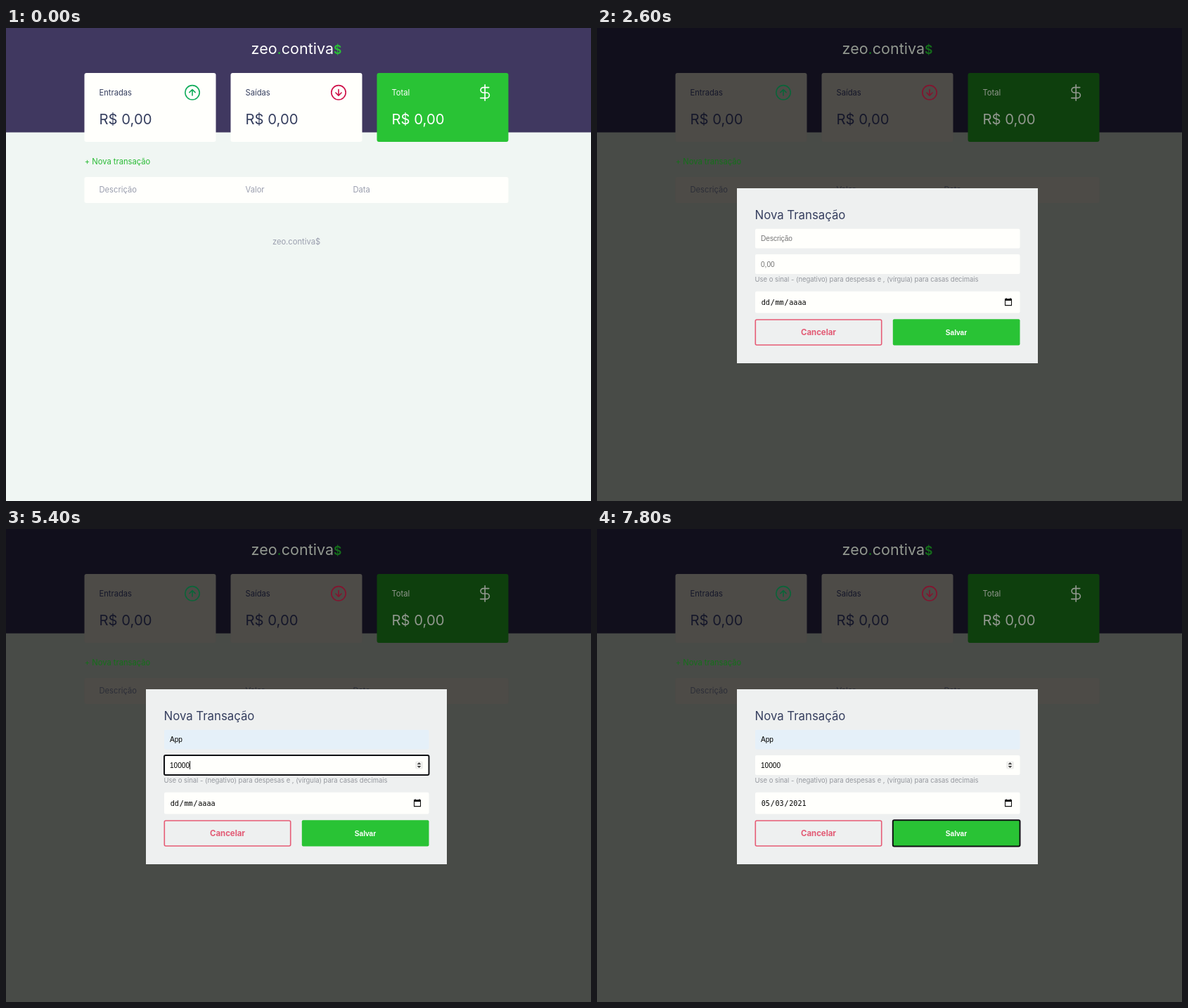
Animation, 832 px wide and 673 px high, one loop 8000 ms. Source, as an HTML page:

```html
<!DOCTYPE html>
<html lang="pt-BR">
<head>
<meta charset="utf-8">
<title>Controle financeiro</title>
<style>
  html, body { margin: 0; width: 100%; height: 100%; overflow: hidden; }
  svg {
    display: block; width: 832px; height: 673px;
    font: 11.2px Inter, sans-serif; font-optical-sizing: none;
    --page: #f0f6f3; --head: #403860; --card: #fffffc; --total: #29c335;
    --ink: #363f5f; --mute: #9a9eae; --light: #fff; --link: #29bb35;
    --up: #12ad5b; --down: #cf1149; --dot: #29c335;
  }
  svg.hover { --link: #31d93e; }
  svg.dim {
    --page: #484b47; --head: #110f1c; --card: #4d4b47; --total: #0e3f0d;
    --ink: #15172a; --mute: #2c2e38; --light: #92988f; --link: #14701a;
    --up: #0c6439; --down: #83142f; --dot: #146e1a;
  }
  .logo { font-size: 21.5px; }
  .money { font-size: 20.3px; }
  .head { font-size: 16.8px; }
  .help { font-size: 9.44px; }
  .strong { font-size: 11.4px; font-weight: 700; }
  .field { font: 10.1px "Liberation Sans", Arial, sans-serif; }
  .bold { font-weight: 700; }
  .mono { font: 10.1px "DejaVu Sans Mono", monospace; }
  .list { font: 500 11.9px "Noto Sans", sans-serif; }
  .shade { filter: drop-shadow(0 1px 2px rgba(0, 0, 0, .45)); }
  .line { fill: none; stroke-width: 1.6; stroke-linecap: round; stroke-linejoin: round; }
</style>
</head>
<body>
<svg id="stage" viewBox="0 0 832 673"></svg>
<script>
const LOOP = 8000;
const stage = document.getElementById('stage');
const brand = ['zeo', 'contiva'];

// Each step changes part of the state from its time (ms) onwards.
const steps = [
  [0, { hover: false, open: false, focus: '', desc: '', amount: '', caret: 0,
        spin: false, list: false, pick: false, filled: false,
        date: ['dd', 'mm', 'aaaa'], part: -1 }],
  [1200, { hover: true }],
  [1800, { open: true }],
  [2400, { spin: true }],
  [2600, { spin: false }],
  [3000, { focus: 'desc', list: true, caret: 233.5 }],
  [3100, { pick: true, desc: 'App', filled: true }],
  [3600, { list: false, caret: 251.5, spin: true }],
  [3900, { focus: 'amount', caret: 233.5 }],
  [4500, { amount: '1', caret: 239.2 }],
  [4800, { amount: '10', caret: 244.8 }],
  [5200, { amount: '1000', caret: 256 }],
  [5400, { amount: '10000', caret: 261.6 }],
  [5700, { focus: 'date', part: 0 }],
  [6200, { date: ['00', 'mm', 'aaaa'] }],
  [6300, { date: ['05', 'mm', 'aaaa'], part: 1 }],
  [6700, { date: ['05', '03', 'aaaa'], part: 2 }],
  [6900, { date: ['05', '03', '0002'] }],
  [7200, { date: ['05', '03', '0202'] }],
  [7400, { date: ['05', '03', '2021'] }],
  [7800, { focus: 'save', part: -1 }]
];

const rect = (x, y, w, h, fill, r = 0, more = '') =>
  `<rect x="${x}" y="${y}" width="${w}" height="${h}" rx="${r}" fill="${fill}" ${more}/>`;
const text = (x, y, s, fill, cls = '', anchor = 'start') =>
  `<text x="${x}" y="${y}" fill="${fill}" class="${cls}" text-anchor="${anchor}">${s}</text>`;
const line = (d, color, more = '') =>
  `<path d="${d}" class="line" stroke="${color}" ${more}/>`;

function card(x, label, fill, ink) {
  return rect(x, 64, 187, 98, fill, 3) +
    text(x + 21, 95.7, label, ink) +
    text(x + 21, 137, 'R$ 0,00', ink, 'money');
}

function arrow(x, dir, color) {
  return `<g transform="translate(${x} 91.8) scale(1 ${dir})">` +
    `<circle r="10.2" class="line" stroke="${color}"/>` +
    line('M0 4.2V-4.2M-4.1 -.2L0 -4.3L4.1 -.2', color) + '</g>';
}

function page() {
  const dot = s => `<tspan fill="var(--dot)">${s}</tspan>`;
  return rect(0, 0, 832, 673, 'var(--page)') +
    rect(0, 0, 832, 148.5, 'var(--head)') +
    text(413, 37, brand[0] + dot('.') + brand[1] +
      '<tspan fill="var(--dot)" font-size="17.5" font-weight="600">$</tspan>',
      'var(--light)', 'logo', 'middle') +
    card(111.5, 'Entradas', 'var(--card)', 'var(--ink)') + arrow(265, 1, 'var(--up)') +
    card(319.5, 'Saídas', 'var(--card)', 'var(--ink)') + arrow(473, -1, 'var(--down)') +
    card(527.5, 'Total', 'var(--total)', 'var(--light)') +
    line('M681.2 80.7V103.3M686.8 84.6H678.8a3.7 3.7 0 0 0 0 7.4h4.8a3.8 3.8 0 0 1 0 7.6H674.8',
      'var(--light)') +
    text(111.7, 194.4, '+ Nova transação', 'var(--link)') +
    rect(111.5, 212, 603, 37, 'var(--card)', 3) +
    text(132.5, 234.3, 'Descrição', 'var(--mute)') +
    text(340.5, 234.3, 'Valor', 'var(--mute)') +
    text(493.5, 234.3, 'Data', 'var(--mute)') +
    text(413, 308.2, brand.join('.') + '$', 'var(--mute)', '', 'middle');
}

// White box with an optional focus ring
function box(x, y, w, h, fill, focused) {
  const ring = focused ? 'stroke="#101114" stroke-width="2"' : '';
  return rect(x, y, w, h, fill, 2, ring);
}

function dateText(parts, part) {
  const char = 6.08, pad = .76;
  let x = 233, out = '';
  parts.forEach((s, i) => {
    const w = s.length * char + pad * 2;
    if (i === part) out += rect(x, 384, w, 13, '#a9cdf5');
    out += text(x + pad, 394, s, '#000', 'mono');
    x += w;
    if (i < 2) out += text(x, 394, '/', '#000', 'mono');
    x += char;
  });
  return out;
}

function dropdown(pick) {
  return rect(224.5, 314.5, 145, 66.5, '#f9f9f6', 1, 'class="shade"') +
    (pick ? rect(224.5, 321, 145, 27, '#dcdcd9') : '') +
    text(233.7, 339, 'App', '#3a3a38', 'list') +
    text(233.7, 366, 'Restaurante', '#3a3a38', 'list');
}

function dialog(s) {
  const on = name => s.focus === name;
  const caret = y => rect(s.caret - .4, y, .9, 12, '#000');
  const value = (v, hint, y) => text(233, y, v || hint, v ? '#000' : '#757575', 'field');
  return rect(199, 228, 428, 249, '#eef0f0') +
    text(224.5, 271.5, 'Nova Transação', '#363f5f', 'head') +
    box(225, 285.8, 376.5, 27.7, s.filled ? '#e5f0f9' : '#fffffc', on('desc')) +
    value(s.desc, 'Descrição', 303) +
    (on('desc') ? caret(293.2) : '') +
    box(225, 322, 376.5, 28, '#fffffc', on('amount')) +
    value(s.amount, '0,00', 339.8) +
    (on('amount') ? caret(330) : '') +
    (s.spin ? rect(582, 330.5, 11, 11, '#efefed', 2) +
      '<path d="M584.7 335L587.5 332L590.3 335ZM584.7 337L587.5 340L590.3 337Z" fill="#404040"/>' : '') +
    text(224.5, 361.2, 'Use o sinal - (negativo) para despesas e , (vírgula) para casas decimais',
      '#94979d', 'help') +
    box(225, 374.7, 376.5, 30.8, '#fffffc', on('date')) +
    dateText(s.date, s.part) +
    '<path d="M580.5 386H589.5V394.6H580.5Z" fill="none" stroke="#111" stroke-width="1.1"/>' +
    rect(580, 385.3, 10, 2.7, '#111') +
    rect(581.5, 384.2, 1.2, 2, '#111') + rect(587.3, 384.2, 1.2, 2, '#111') +
    rect(225.3, 415, 179.4, 36, 'none', 2, 'stroke="#e65c76" stroke-width="1.6"') +
    text(315, 437, 'Cancelar', '#e25a74', 'strong', 'middle') +
    box(420.8, 414.3, 180.7, 37.2, '#29c335', on('save')) +
    text(511, 436.8, 'Salvar', '#fff', 'field bold', 'middle') +
    (s.list ? dropdown(s.pick) : '');
}

let shown = -1;
function draw(now) {
  const t = now % LOOP;
  const count = steps.filter(([at]) => at <= t).length;
  if (count !== shown) {
    shown = count;
    const s = Object.assign({}, ...steps.slice(0, count).map(step => step[1]));
    stage.setAttribute('class', s.open ? 'dim' : s.hover ? 'hover' : '');
    stage.innerHTML = page() + (s.open ? dialog(s) : '');
  }
}

const start = performance.now();
function tick() {
  draw(performance.now() - start);
  requestAnimationFrame(tick);
}
tick();
</script>
</body>
</html>
```
